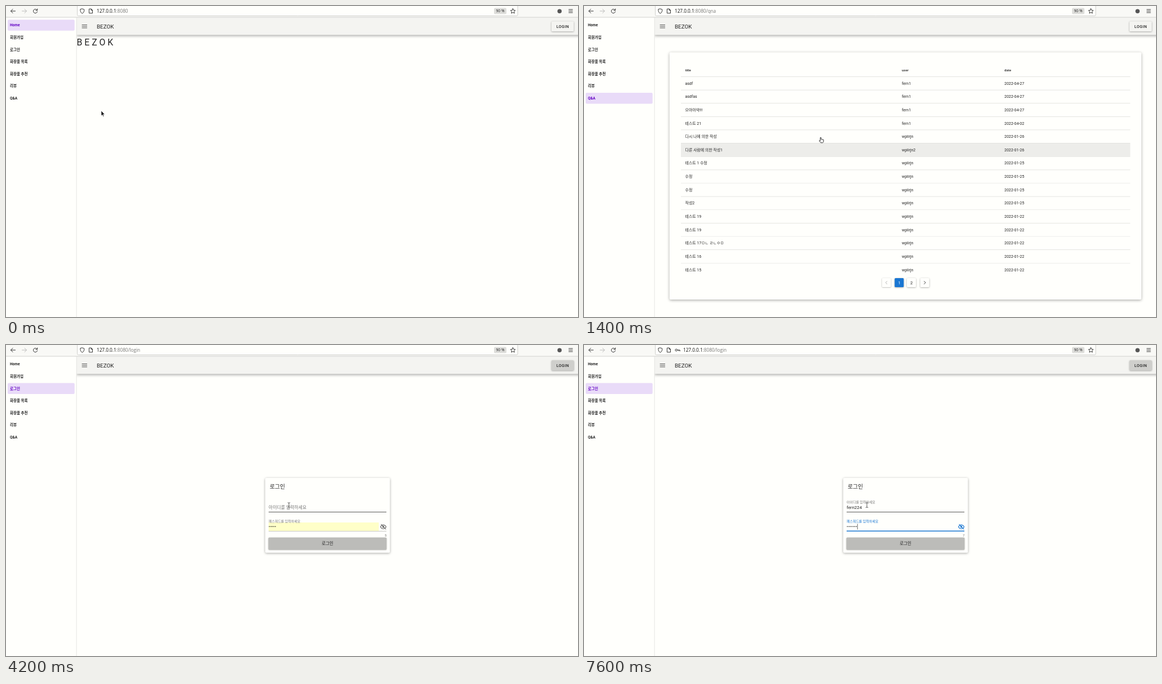
Animation of 1015x552 px, one loop 8 s. Source, as an HTML page with a canvas:

```html
<!DOCTYPE html>
<html lang="ko">
<head>
<meta charset="utf-8">
<style>
html, body { margin: 0; width: 100%; height: 100%; overflow: hidden; background: #fffffc; }
canvas { display: block; }
</style>
</head>
<body>
<canvas id="stage" width="1015" height="552"></canvas>
<script>
const ctx = document.getElementById('stage').getContext('2d');
const UI = 'Roboto, "Noto Sans CJK KR", sans-serif';
const CHROME = '"Open Sans", sans-serif';
const PAPER = '#fffffc', BAR = '#f4f4f1', INK = '#222', BLUE = '#1976d2', PURPLE = '#6200c4';
const BRAND = 'BEZOK';
const LOOP = 8000;

const menu = ['Home', '회원가입', '로그인', '화장품 목록', '화장품 추천', '리뷰', 'Q&A'];
const posts = [
  ['asdf', 'fern1', '04-27'], ['asdfas', 'fern1', '04-27'], ['으아아악!!!', 'fern1', '04-27'],
  ['테스트 21', 'fern1', '04-02'], ['다시 나에 의한 작성', 'wplirjn', '01-26'],
  ['다른 사람에 의한 작성1', 'wplirjn2', '01-26'], ['테스트 1 수정', 'wplirjn', '01-25'],
  ['수정', 'wplirjn', '01-25'], ['수정', 'wplirjn', '01-25'], ['작성2', 'wplirjn', '01-25'],
  ['테스트 19', 'wplirjn', '01-22'], ['테스트 19', 'wplirjn', '01-22'],
  ['테스트 17ㅁㄴ ㄹㄴㅇㅁ', 'wplirjn', '01-22'], ['테스트 16', 'wplirjn', '01-22'],
  ['테스트 15', 'wplirjn', '01-22']
];

// [time, x, y, shape]
const pointer = [
  [0, 169, 186, 'arrow'], [100, 161, 184, 'arrow'], [200, 134, 179, 'arrow'], [300, 98, 173, 'arrow'],
  [400, 68, 169, 'arrow'], [500, 57, 168, 'arrow'], [700, 59, 167, 'hand'], [1000, 76, 163, 'hand'],
  [1100, 90, 157, 'arrow'], [1200, 93, 151, 'arrow'], [1400, 420, 233, 'hand'], [1500, 881, 474, 'arrow'],
  [1700, 932, 512, 'arrow'], [1800, 971, 529, 'arrow'], [1900, 965, 515, 'arrow'], [2000, 958, 504, 'arrow'],
  [2200, 955, 474, 'arrow'], [2500, 952, 390, 'arrow'], [2600, 960, 250, 'arrow'], [2700, 980, 110, 'arrow'],
  [2800, 988, 48, 'arrow'], [2900, 990, 37, 'hand'], [3400, 965, 54, 'arrow'], [3500, 850, 80, 'arrow'],
  [3600, 696, 122, 'arrow'], [3800, 520, 303, 'arrow'], [4000, 506, 289, 'ibeam'], [4100, 502, 284, 'ibeam'],
  [4600, 502, 283, 'arrow'], [6000, 502, 284, 'ibeam']
];
const userTyping = [[0, ''], [4700, 'f'], [4800, 'fe'], [4900, 'fer'], [5000, 'fern'],
  [5600, 'fern2'], [5700, 'fern22'], [5800, 'fern224']];
const passTyping = [[0, 0], [3500, 5], [6600, 1], [6700, 2], [6900, 3], [7100, 4], [7300, 5], [7600, 7]];
const loginShade = [[0, BAR], [2800, '#e5e5e2'], [2900, '#d0d0cd'], [3100, '#b0b0ad'], [3200, '#9b9b98'],
  [3300, '#a4a4a1'], [3400, '#b7b7b4'], [3500, '#c5c5c2'], [3600, '#cfcfcc']];

const latest = (keys, t) => keys.filter(k => k[0] <= t).pop();
const progress = (t, start, length) => {
  const p = Math.min(1, Math.max(0, (t - start) / length));
  return 1 - (1 - p) ** 3;
};

function text(s, x, middle, size, { color = INK, weight = 400, align = 'left', font = UI, spacing = 0 } = {}) {
  ctx.font = `${weight} ${size}px ${font}`;
  ctx.fillStyle = color;
  ctx.textAlign = align;
  ctx.letterSpacing = spacing + 'px';
  ctx.fillText(s, x, middle + size * 0.36);
  return ctx.measureText(s).width;
}

function box(x, y, w, h, color, { r = 0, shadow = 0, border } = {}) {
  ctx.save();
  ctx.beginPath();
  ctx.roundRect(x, y, w, h, r);
  if (shadow) {
    ctx.shadowColor = 'rgba(0,0,0,.35)';
    ctx.shadowBlur = shadow;
    ctx.shadowOffsetY = shadow / 4;
  }
  ctx.fillStyle = color;
  ctx.fill();
  ctx.restore();
  if (border) {
    ctx.strokeStyle = border;
    ctx.lineWidth = 1;
    ctx.stroke();
  }
}

function stroke(d, x, y, color = '#333', width = 1, fill) {
  const path = new Path2D(d);
  ctx.save();
  ctx.translate(x, y);
  ctx.lineJoin = ctx.lineCap = 'round';
  if (fill) {
    ctx.fillStyle = fill;
    ctx.fill(path);
  }
  ctx.strokeStyle = color;
  ctx.lineWidth = width;
  ctx.stroke(path);
  ctx.restore();
}

function drawBrowser(path, t) {
  box(0, 0, 1015, 20, '#f9f9f6');
  box(0, 19.6, 1015, 0.8, '#d2d2cf');
  box(126.5, -3.5, 781.5, 21, PAPER, { r: 2, border: '#cfcfcc' });
  const arrow = 'M4 0H-4M-.5 -3.5L-4 0L-.5 3.5';
  stroke(arrow, 12.5, 9);
  ctx.save();
  ctx.scale(-1, 1);
  stroke(arrow, -32.5, 9, '#bbb');
  ctx.restore();
  stroke('M3.3 -1.5A3.6 3.6 0 1 0 3.6 1M3.7 -4V-1.2H.9', 52, 9);
  stroke('M0 -4L3.5 -2.8C3.5 1 2.5 3 0 4.2C-2.5 3 -3.5 1 -3.5 -2.8Z', 135.3, 9);
  stroke('M-2.8 -3.8H.6L2.9 -1.5V3.8H-2.8ZM.6 -3.8V-1.5H2.9', 150.6, 9);
  let x = 161;
  if (t >= 4700) {
    stroke('M-.5 0A1.8 1.8 0 1 1 -4.1 0A1.8 1.8 0 1 1 -.5 0H4.2V1.8M2 0V1.5', 166, 9);
    x = 176;
  }
  x += text('127.0.0.1', x, 9, 8.2, { font: CHROME, color: '#111' });
  text(':8080' + path, x, 9, 8.2, { font: CHROME, color: '#777' });
  box(866, 3.5, 22, 11, '#dededb', { r: 2 });
  text('90 %', 877, 9, 6.8, { font: CHROME, align: 'center' });
  stroke('M0 -4.3L1.3 -1.4L4.3 -1.1L2 1L2.7 4L0 2.4L-2.7 4L-2 1L-4.3 -1.1L-1.3 -1.4Z', 899.5, 9);
  box(978.5, 5.5, 7.5, 7.5, '#555', { r: 3.75 });
  stroke('M-3.3 -2.8H3.3M-3.3 0H3.3M-3.3 2.8H3.3', 1002, 9);
}

function drawHeader(t) {
  box(125, 20, 900, 31.3, BAR, { shadow: 5 });
  stroke('M-4.3 -2.7H4.3M-4.3 0H4.3M-4.3 2.7H4.3', 139.3, 36.2, '#444', 0.9);
  text(BRAND, 161, 36.2, 9.8);
  box(968, 27.3, 39.5, 17.7, latest(loginShade, t)[1], { r: 1.5, shadow: t >= 3100 && t < 3400 ? 6 : 3 });
  text('LOGIN', 976.7, 36, 7, { weight: 500, spacing: 0.5 });
}

function drawMenu(active, shade) {
  box(0, 20.4, 125, 532, PAPER);
  box(124.7, 20.4, 0.8, 532, '#dededb');
  menu.forEach((label, i) => {
    const y = 34 + i * 21.62;
    if (i === active) box(3, y - 9.8, 118.7, 19.6, shade, { r: 2 });
    text(label, 7, y, 6.5, { weight: 700, color: i === active ? PURPLE : INK });
  });
}

function drawBoard(hovered) {
  box(151.7, 82.3, 837.3, 438.7, PAPER, { r: 2, shadow: 5 });
  ['title', 'user', 'date'].forEach((s, i) => text(s, [179.5, 564, 746][i], 113.4, 6, { weight: 500 }));
  posts.forEach(([title, user, date], i) => {
    const y = 137.2 + i * 23.63;
    if (i === hovered) box(172, y - 11.8, 797.3, 23.6, '#ededea');
    box(172, y - 12.1, 797.3, 0.7, '#dcdcd9');
    text(title, 179.5, y, 6.95);
    text(user, 564, y, 6.95);
    text('2022-' + date, 746, y, 6.95);
  });
  [528.7, 551.3, 573, 596.7].forEach((x, i) =>
    box(x, 483, 16, 16, i === 1 ? BLUE : PAPER, { r: 1.5, shadow: i === 0 ? 2 : 3 }));
  stroke('M1.2 -2.5L-1.3 0L1.2 2.5', 536.5, 491, '#aaa', 0.9);
  text('1', 559.5, 491, 7.5, { color: '#fff', align: 'center' });
  text('2', 581, 491, 7.5, { align: 'center' });
  stroke('M-1.2 -2.5L1.3 0L-1.2 2.5', 604.8, 491, '#333', 0.9);
}

function drawField({ label, value, y, lift, focus, focused, hovered, autofilled, caret }) {
  if (autofilled) box(466, y - 7.5, 195.5, 15, '#ffffc8');
  box(466, y + 7.6, 209, 0.8, hovered ? '#222' : '#b5b5b2');
  if (focus) box(570.5 - 104.5 * focus, y + 7, 209 * focus, 1.5, BLUE);
  text(label, 466, y - 10.2 * lift, 7.9 - 1.95 * lift, { color: focused ? BLUE : '#777' });
  const width = text(value, 466, y, 7.9);
  if (caret) box(466 + width + 0.2, y - 5, 0.8, 10, '#444');
}

function drawLogin(t) {
  const inUser = t >= 4400 && t < 6000, inPass = t >= 6000;
  const dots = latest(passTyping, t)[1];
  box(460, 236, 221.3, 132.7, PAPER, { r: 2, shadow: 4 });
  text('로그인', 468, 251, 9.8);
  drawField({
    label: '아이디를 입력하세요', value: latest(userTyping, t)[1], y: 288.6,
    lift: progress(t, 4300, 300), focus: inUser ? progress(t, 4300, 300) : 0,
    focused: inUser, hovered: t >= 3800, caret: inUser && t !== 5500
  });
  drawField({
    label: '패스워드를 입력하세요', value: '•'.repeat(dots), y: 322.6,
    lift: progress(t, 3300, 200), focus: inPass ? progress(t, 5900, 400) : 0,
    focused: inPass, hovered: false, autofilled: dots && t < 6600, caret: t >= 6600
  });
  const eye = inPass ? BLUE : '#666';
  stroke('M-5 0C-2.8 -4.6 2.8 -4.6 5 0C2.8 4.6 -2.8 4.6 -5 0Z', 669.5, 322.8, eye, 1.1);
  box(667.7, 321, 3.6, 3.6, eye, { r: 1.8 });
  stroke('M-3.6 -4.4L4.4 4.2', 669.5, 322.8, eye, 1.1);
  text(dots, 675.3, 338, 6, { align: 'right', color: '#777' });
  box(465.7, 341.7, 209.5, 21.5, '#bcbcb9', { r: 1.5, shadow: 2 });
  text('로그인', 570.5, 352.5, 7.5, { weight: 500, align: 'center' });
  if (t >= 4500 && t < 6000) {
    box(465.2, 296.3, 210.3, 26.4, PAPER, { r: 1, shadow: 3, border: '#bcbcb9' });
    box(466.8, 298.5, 207.5, 22.5, '#ecece9');
    text('저장된 로그인 보기', 569.5, 310.2, 7.9, { align: 'center' });
  }
}

function drawStatus(url) {
  box(-2, 540.5, 77, 14, '#f4f4f1', { r: 2, border: '#ccccc9' });
  text(url, 3, 546.5, 6.8, { font: CHROME, color: '#444' });
}

function drawPointer([, x, y, shape]) {
  if (shape === 'arrow')
    stroke('M0 0V9L2 7.1L3.4 10.3L4.8 9.7L3.4 6.6H6Z', x, y, '#fff', 0.6, '#111');
  else if (shape === 'hand')
    stroke('M-.8 5V.6Q0 -.5 .8 .6V3.5L5 4.3V7Q4.8 9.5 3.5 9.7H.2L-2.7 6.2Q-2.6 5 -.8 6Z', x, y, '#222', 0.9, '#fff');
  else
    stroke('M-1.8 -4.2Q0 -4.2 0 -3.2Q0 -4.2 1.8 -4.2M0 -3.2V3.6M-1.8 4.5Q0 4.5 0 3.6Q0 4.5 1.8 4.5', x, y, '#333', 0.8);
}

function draw(now) {
  const t = Math.floor(now % LOOP / 100) * 100;
  const page = t < 1000 ? 'home' : t < 3300 ? 'board' : 'login';
  box(0, 0, 1015, 552, PAPER);
  if (page === 'home') text([...BRAND].join(' '), 125.5, 64, 15.8);
  if (page === 'board') drawBoard(t === 1400 ? 5 : -1);
  if (page === 'login') drawLogin(t);
  drawHeader(t);
  drawMenu({ home: 0, board: 6, login: 2 }[page], t >= 1000 && t < 1200 ? '#e0cdf3' : '#e9dbf8');
  drawBrowser(t < 1000 ? '' : t < 3200 ? '/qna' : '/login', t);
  if (t >= 700 && t < 1000) drawStatus('127.0.0.1:8080/qna');
  if (t >= 2900 && t < 3200) drawStatus('127.0.0.1:8080/login');
  drawPointer(latest(pointer, t));
}

function tick() {
  draw(performance.now());
  requestAnimationFrame(tick);
}
tick();
</script>
</body>
</html>
```
